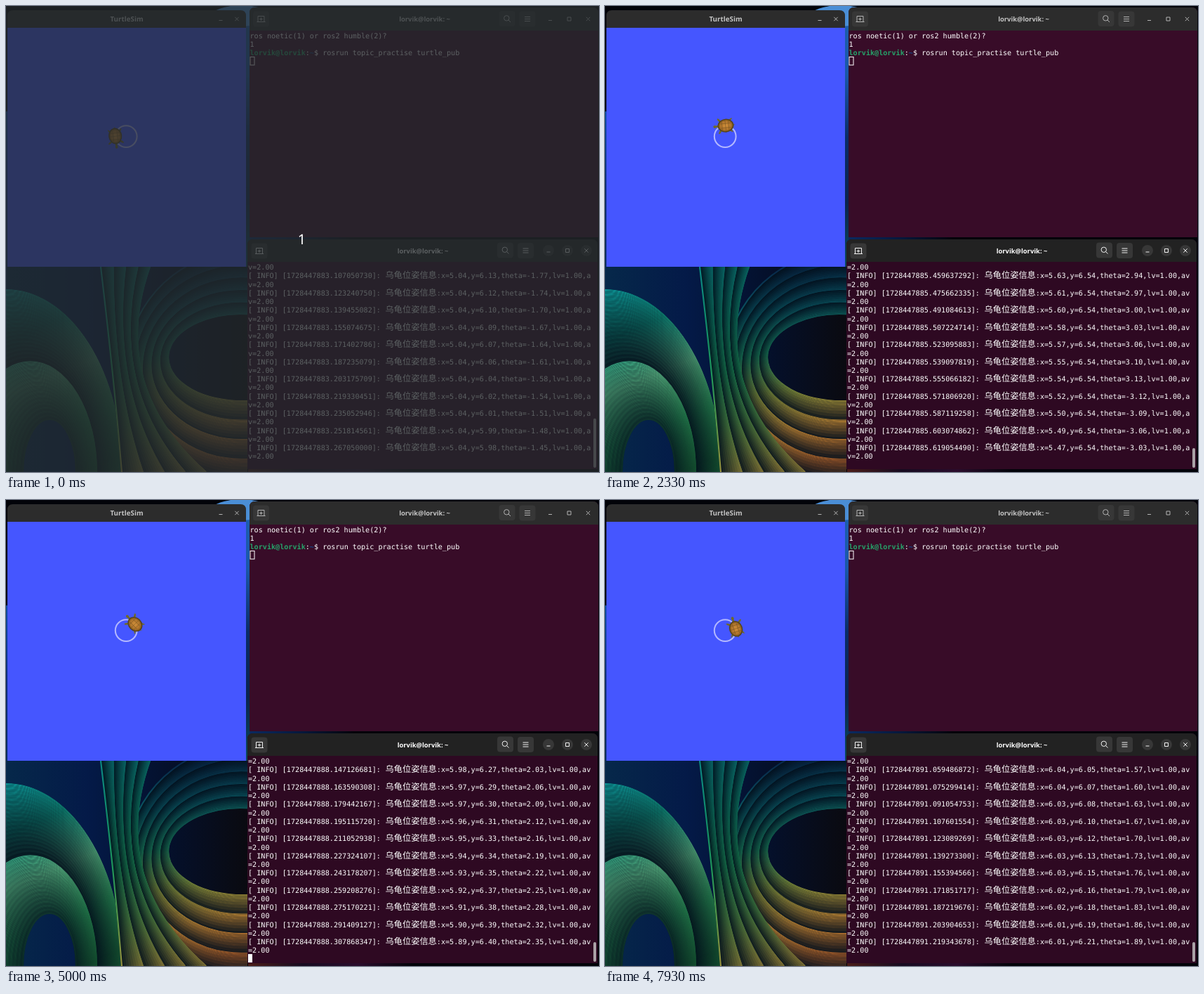
These frames come from a looping animation (845 px wide and 663 px high, 8000 ms). An HTML page with a canvas:

```html
<!DOCTYPE html>
<html lang="en">
<head>
<meta charset="utf-8">
<title>TurtleSim</title>
<style>
html, body { margin: 0; width: 100%; height: 100%; overflow: hidden; background: #000; }
canvas, svg { position: absolute; left: 0; top: 0; display: block; }
text { white-space: pre; text-rendering: geometricPrecision; fill: #fff; }
.mono { font: 10.15px "DejaVu Sans Mono", monospace; }
.cjk { font: 12.22px "Noto Sans CJK SC", "Noto Sans CJK JP", "Noto Sans CJK", sans-serif; }
.title { font: bold 9.4px "Noto Sans", "Open Sans", sans-serif; text-anchor: middle; }
.count { font: 20px "Noto Sans", "Open Sans", sans-serif; text-anchor: middle; }
.user { font-weight: bold; fill: #26a269; }
.path { font-weight: bold; fill: #12488b; }
.icon { fill: none; stroke: currentColor; stroke-width: 1; }
.plate { fill: #373737; stroke: none; }
.idle { color: #b4b4b4; }
.idle .title { fill: #c4c4c4; }
.live { color: #f2f2f2; }
</style>
</head>
<body>
<canvas id="wall" width="845" height="663"></canvas>
<svg width="845" height="663" viewBox="0 0 845 663">
  <defs>
    <radialGradient id="shell">
      <stop offset="0" stop-color="#d2913c"/>
      <stop offset=".7" stop-color="#b0742b"/>
      <stop offset="1" stop-color="#6e501c"/>
    </radialGradient>
    <rect id="plate" class="plate" x="-11.5" y="-11" width="23" height="22" rx="4"/>
    <circle id="disc" class="plate" r="8"/>
    <g id="tab" class="icon"><use href="#plate"/><path d="M-4.5 4V-4H4.5V4M-6 4H6M0-2V2.4M-2.2 .2H2.2"/></g>
    <g id="search" class="icon"><use href="#plate"/><circle cx="-.7" cy="-.7" r="3.7"/><path d="M2 2 5 5"/></g>
    <g id="menu" class="icon"><use href="#plate"/><path d="M-4-3H4M-4 0H4M-4 3H4"/></g>
    <path id="min" class="icon" d="M-2.5 2.5H2.5"/>
    <path id="max" class="icon" d="M-2.5-2.5H2.5V2.5H-2.5Z"/>
    <path id="close" class="icon" d="M-2.7-2.7 2.7 2.7M2.7-2.7-2.7 2.7"/>
    <path id="flipper" d="M3.5-7Q7-12.500 8.500-10.500 8-8 6-6Z"/>
    <path id="foot" d="M-9-5.500Q-13.500-9-12.500-10-10-9.500-7-7Z"/>
  </defs>

  <g class="idle">
    <path d="M2 31V14Q2 6 10 6H334Q342 6 342 14V31Z" fill="#2c2c2c"/>
    <text class="title" x="172" y="22.3" style="font-size:9.8px">TurtleSim</text>
    <use href="#min" x="306" y="18"/>
    <use href="#close" x="329" y="18.5"/>
    <rect x="2" y="31" width="340" height="340" fill="#4556ff"/>
    <circle cx="171.2" cy="185.6" r="15.4" fill="none" stroke="#b3b8ff" stroke-width="2"/>
    <g id="turtle">
      <g fill="#6f6a26">
        <path d="M-13-1.2-16 0-13 1.2Z"/>
        <use href="#flipper"/>
        <use href="#flipper" transform="scale(1 -1)"/>
        <use href="#foot"/>
        <use href="#foot" transform="scale(1 -1)"/>
        <path d="M7-1.8 10.5-1.2Q12.5-2.600 14.3-1.500 16 0 14.3 1.500 12.5 2.600 10.5 1.2L7 1.800Z"/>
      </g>
      <ellipse cx="-2.8" rx="10.800" ry="8.900" fill="url(#shell)" stroke="#54431a" stroke-width="1.3"/>
      <path d="M-10-3H4.5M-10 3H4.5M-7-6.5V6.5M-2.5-8V8M2.5-6.5V6.5" fill="none" stroke="#7a5522" stroke-width=".6"/>
    </g>
  </g>

  <g class="idle">
    <path d="M347 329V10Q347 2 355 2H836Q844 2 844 10V329Z" fill="#380c28"/>
    <path d="M347 35V10Q347 2 355 2H836Q844 2 844 10V35Z" fill="#2c2c2c"/>
    <use href="#tab" x="363.5" y="18.5"/>
    <use href="#search" x="714" y="18"/>
    <use href="#menu" x="743" y="18.5"/>
    <use href="#min" x="775.5" y="18"/>
    <use href="#max" x="802.5" y="18.5"/>
    <use href="#close" x="829.5" y="18.5"/>
    <text class="title" x="596.5" y="21.8">lorvik@lorvik: ~</text>
    <text class="mono" x="347.5" y="45.7">ros noetic(1) or ros2 humble(2)?</text>
    <text class="mono" x="347.5" y="57.9">1</text>
    <text class="mono" x="347.5" y="70.1"><tspan class="user">lorvik@lorvik</tspan>:<tspan class="path">~</tspan>$ rosrun topic_practise turtle_pub</text>
    <rect x="348" y="72.5" width="6" height="11.5" fill="none" stroke="#fff"/>
  </g>

  <g class="live">
    <path d="M344 659V340Q344 332 352 332H835Q843 332 843 340V659Z" fill="#2e0922"/>
    <path d="M344 364V340Q344 332 352 332H835Q843 332 843 340V364Z" fill="#222"/>
    <use href="#tab" x="361" y="348.5"/>
    <use href="#search" x="711.5" y="347.5"/>
    <use href="#menu" x="740.5" y="348"/>
    <use href="#disc" x="773" y="348"/><use href="#min" x="773" y="347.5"/>
    <use href="#disc" x="800" y="348"/><use href="#max" x="800" y="348"/>
    <use href="#disc" x="827" y="348"/><use href="#close" x="827" y="348"/>
    <text class="title" x="594" y="351.5">lorvik@lorvik: ~</text>
    <g id="log"></g>
    <rect id="cursor" x="345" y="646" width="6" height="12" fill="#fff"/>
    <rect id="bar" x="837" width="4" rx="2" fill="#aaa2a7"/>
  </g>

  <g id="countdown">
    <rect width="845" height="663" fill="#252a2d" fill-opacity=".75"/>
    <text class="count" x="421.5" y="339">1</text>
  </g>
</svg>
<script>
const $ = id => document.getElementById(id);
const lerp = (a, b, u) => a + (b - a) * u;

// ---------- wallpaper ----------
const ctx = $('wall').getContext('2d');

function gradient(x0, y0, x1, y1, ...colors) {
  const g = ctx.createLinearGradient(x0, y0, x1, y1);
  colors.forEach((c, i) => g.addColorStop(i / (colors.length - 1), c));
  return g;
}

function block(x, y, w, h, ...colors) {
  ctx.fillStyle = gradient(x, y, w > h ? x + w : x, w > h ? y : y + h, ...colors);
  ctx.fillRect(x, y, w, h);
}

// Sweeps a curve through u = 0..1; every fold starts lit and falls into shadow.
function drape(paint, folds, trace) {
  const COUNT = 160;
  ctx.lineWidth = 2.2;
  for (let i = 0; i <= COUNT; i++) {
    const u = i / COUNT, depth = (u * folds) % 1;
    ctx.beginPath();
    trace(u);
    ctx.globalAlpha = 1;
    ctx.strokeStyle = '#03101c';
    ctx.stroke();
    ctx.globalAlpha = lerp(0.95, 0.08, depth ** 0.8) + 0.04 * Math.sin(i * 1.3);
    ctx.strokeStyle = paint;
    ctx.stroke();
  }
  ctx.globalAlpha = 1;
}

function paintWallpaper() {
  block(0, 0, 845, 663, '#020309', '#020309');
  block(0, 150, 2, 221, '#0d4a9c', '#0a2a70', '#062a58');
  block(341, 5, 7, 366, '#1d5fae', '#1a58aa', '#0a2c68', '#0a2450', '#0a4a5c');
  block(347, 329, 150, 4, '#0a2a60', '#06183c', '#020309');
  block(345, 659, 235, 4, '#4a1c18', '#160a20', '#2a0c2c', '#020309');
  ctx.fillStyle = '#4a8ed6';
  ctx.beginPath();
  ctx.ellipse(335, 14, 42, 15, 0, 0, 7);
  ctx.fill();

  ctx.save();
  ctx.beginPath();
  ctx.rect(0, 371, 344, 292);
  ctx.clip();
  block(0, 371, 344, 292, '#06284a', '#041a48', '#04102c', '#0a0a10');

  const loop = gradient(225, 380, 270, 660, '#082a4c', '#0a5a66', '#1c8a60', '#86963c', '#c88a34', '#a85a28');
  drape(loop, 5, u => ctx.ellipse(335, 500 + 25 * u, 104 + 62 * u, 62 + 113 * u, 0, 0.3 * Math.PI, 1.55 * Math.PI));

  const arch = gradient(0, 400, 110, 663, '#0c9a9e', '#0f8a78', '#5cba86', '#2c9a58', '#1c6c38');
  drape(arch, 1.8, u => ctx.ellipse(62 * u, 663, 165 - 127 * u, 259 - 184 * u, 0, Math.PI, 2 * Math.PI));

  const fan = gradient(150, 371, 220, 663, '#0c8a86', '#109070', '#1f9a5c', '#5c9a48', '#a8923c');
  drape(fan, 4, u => {
    ctx.moveTo(205 - 70 * u, 371);
    ctx.quadraticCurveTo(145 + 10 * u, 540, 285 - 120 * u, 663);
  });
  ctx.restore();
}

// ---------- log ----------
const CELL = 6.11, ROW = 12.23, LEFT = 345, FIRST_BASELINE = 375.2, COLUMNS = 80, ENTRIES = 11;
const LABEL = '乌龟位姿信息';

function addText(cls, column, row) {
  const el = document.createElementNS('http://www.w3.org/2000/svg', 'text');
  el.setAttribute('class', cls);
  el.setAttribute('x', LEFT + column * CELL);
  el.setAttribute('y', FIRST_BASELINE + row * ROW);
  return $('log').appendChild(el);
}

// Each entry fills one row and wraps the rest onto the next.
const slots = Array.from({ length: ENTRIES + 1 }, (_, i) => {
  const row = 2 * i - 1, slot = { rest: addText('mono', 0, row + 1) };
  if (i) {
    slot.head = addText('mono', 0, row);
    addText('cjk', 32, row).textContent = LABEL;
    slot.tail = addText('mono', 44, row);
  }
  return slot;
});

function pose(n) {
  const turn = -1.448 + 0.032 * n;
  const theta = Math.atan2(Math.sin(turn), Math.cos(turn));
  return {
    theta,
    x: 5.5364 + 0.5 * Math.sin(theta + 0.016),
    y: 6.0444 - 0.5 * Math.cos(theta + 0.016)
  };
}

function stamp(n) {
  const noise = Math.abs(Math.sin(n * 12.9898) * 43758.5453) % 1;
  const ns = 267050000 + 16e6 * n + Math.floor(9e5 * noise * noise);
  const seconds = Math.floor(ns / 1e9);
  return `${1728447883 + seconds}.${String(ns - seconds * 1e9).padStart(9, '0')}`;
}

function showLog(n) {
  const room = COLUMNS - 44;
  slots.forEach((slot, i) => {
    const id = n - ENTRIES + i, p = pose(id);
    const values = `:x=${p.x.toFixed(2)},y=${p.y.toFixed(2)},theta=${p.theta.toFixed(2)},lv=1.00,av=2.00`;
    slot.rest.textContent = values.slice(room);
    if (!i) return;
    slot.head.textContent = `[ INFO] [${stamp(id)}]: `;
    slot.tail.textContent = values.slice(0, room);
  });
}

// ---------- timing ----------
const LOOP = 8000, STEP = 16;

// The simulation runs up to two steps ahead of the clock around the middle of the loop.
const stepAt = t => Math.round(t / STEP + 2.15 * Math.sqrt(Math.sin(Math.PI * t / 9600)));

let shown = -1;

function render(time) {
  // 15 pictures a second, each starting on a multiple of 10 ms
  const k = Math.floor((Math.floor(time / 10) * 10 + 3.4) * 3 / 200);
  if (k === shown) return;
  shown = k;
  const t = Math.round(k * 20 / 3) * 10;
  const n = stepAt(t), p = pose(n);

  $('turtle').setAttribute('transform',
    `translate(${1.7 + 30.62 * p.x} ${371 - 30.66 * p.y}) rotate(${-p.theta * 180 / Math.PI})`);
  showLog(n);

  const phase = t % 1200;
  $('cursor').style.display = phase >= 100 && phase < 700 ? '' : 'none';

  const height = Math.max(28, 293 * 24 / (100 + 2 * n));
  $('bar').setAttribute('height', height);
  $('bar').setAttribute('y', 657 - height);
  $('countdown').style.display = k ? 'none' : '';
}

paintWallpaper();
render(0);
let start;
function tick(now) {
  start ??= now;
  render((now - start) % LOOP);
  requestAnimationFrame(tick);
}
requestAnimationFrame(tick);
</script>
</body>
</html>
```
